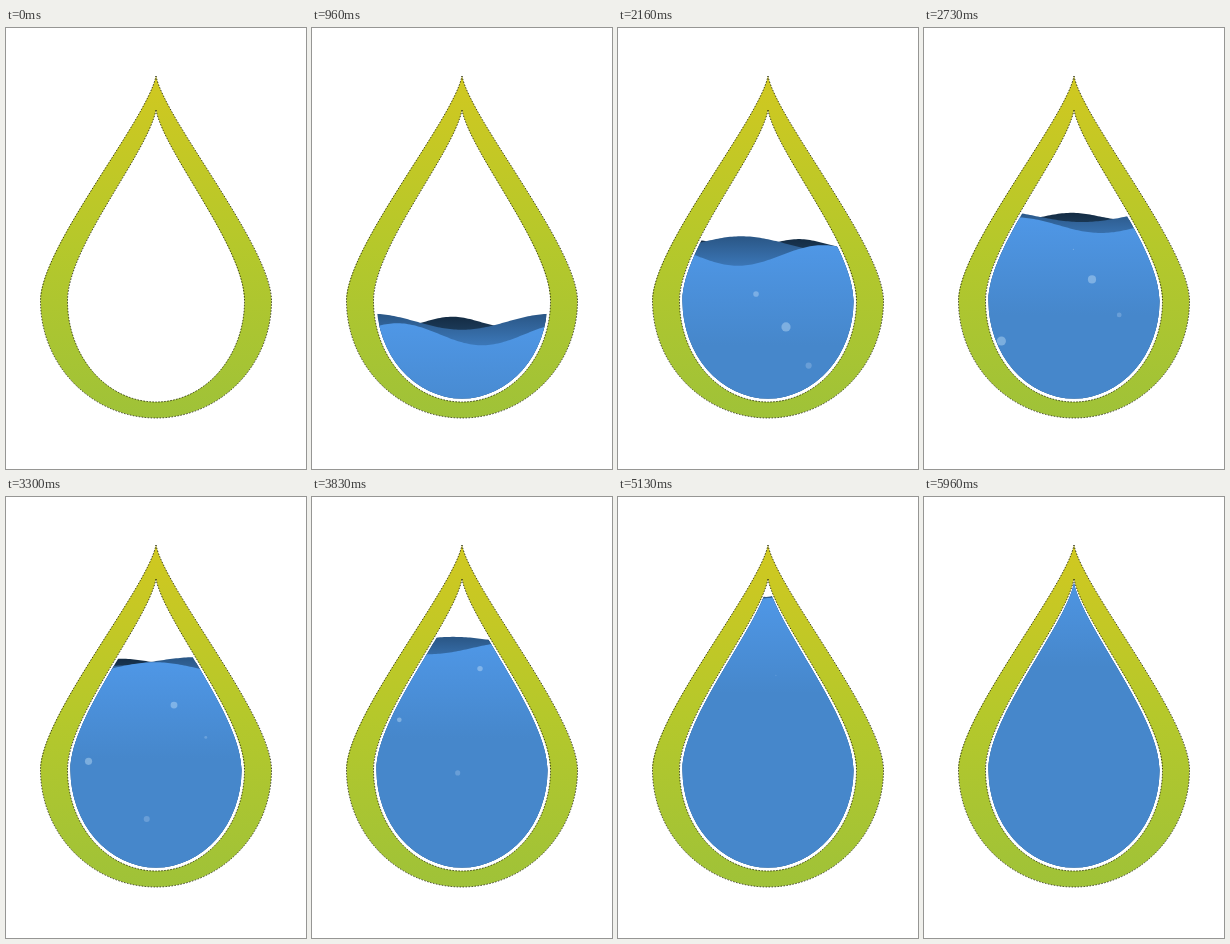
An HTML page with a canvas that plays this animation: 300 px wide and 441 px high, repeating every 6000 ms.

```html
<!DOCTYPE html>
<html lang="en">
<head>
<meta charset="utf-8">
<title>Filling drop</title>
<style>
  html, body { margin: 0; width: 100%; height: 100%; overflow: hidden; background: #fff; }
  canvas { display: block; width: 300px; height: 441px; }
</style>
</head>
<body>
<canvas id="stage"></canvas>
<script>
const W = 300, H = 441, LOOP = 6000, CX = 150, BELLY = 273, TAU = 2 * Math.PI;
const canvas = document.getElementById('stage');
const ratio = window.devicePixelRatio || 1;
canvas.width = W * ratio;
canvas.height = H * ratio;
const ctx = canvas.getContext('2d');
ctx.scale(ratio, ratio);

// A curved flank from the tip to the belly, closed by half an ellipse
function drop(tip, radius, bottom) {
  const path = new Path2D();
  const neck = 9, neckY = tip + 44, hipY = 219;
  path.moveTo(CX, tip);
  path.bezierCurveTo(CX + neck, neckY, CX + radius, hipY, CX + radius, BELLY);
  path.ellipse(CX, BELLY, radius, bottom - BELLY, 0, 0, Math.PI);
  path.bezierCurveTo(CX - radius, hipY, CX - neck, neckY, CX, tip);
  path.closePath();
  return path;
}

const tank = drop(86, 85.5, 370.5);
const ring = drop(48, 115.5, 390);
ring.addPath(drop(82, 88.5, 374));

function gradient(y0, y1, ...colors) {
  const g = ctx.createLinearGradient(0, y0, 0, y1);
  colors.forEach((c, i) => g.addColorStop(i / (colors.length - 1), c));
  return g;
}
const ringFill = gradient(48, 390, '#d0c820', '#b5c82b', '#9fc238');

// Fast at first, then a steady rise
const waterLevel = t => 250 - 30 * t + 145 * Math.exp(-0.72 * t);

// Back to front; crest is a peak's x at t = 0, speed in px/s
const waves = [
  { dip: 0, amp: 5, length: 110, crest: 196, speed: -58, depth: 22, colors: ['#142c44', '#23486c'] },
  { dip: 0, amp: 8, length: 180, crest: 333, speed: -97, depth: 22, colors: ['#2a5685', '#3b76b6'] },
  { dip: 12.5, amp: 11, length: 170, crest: -11, speed: 100, depth: 90, colors: ['#4f97e6', '#4687cb'] }
];

function drawWave(w, t, level) {
  const calm = Math.min(1, Math.max(0.55, 1 - (t - 2) * 0.4));
  const amp = w.amp * calm, mid = level + w.dip * calm;
  const crest = w.crest + w.speed * t;
  ctx.beginPath();
  ctx.moveTo(0, H);
  for (let x = 0; x <= W; x += 2) {
    ctx.lineTo(x, mid - amp * Math.cos((x - crest) / w.length * TAU));
  }
  ctx.lineTo(W, H);
  ctx.fillStyle = gradient(mid - amp, mid + w.depth, ...w.colors);
  ctx.fill();
}

const bubbles = [
  { born: 1.01, x: 115, drift: 20, r: 4.8, life: 1.75 },
  { born: 1.4, x: 168, drift: 0, r: 5.3, life: 3.3 },
  { born: 1.83, x: 188, drift: 8, r: 3.4, life: 1.8 },
  { born: 2.13, x: 72, drift: 9, r: 5.4, life: 2.1 },
  { born: 2.8, x: 136, drift: 9.4, r: 3.4, life: 2.4 }
];

// Bubbles slow down and shrink as they climb
function drawBubble(b, t) {
  const age = t - b.born;
  if (age < 0 || age > b.life) return;
  const y = 369 - 97 * age + 6.5 * age * age;
  const r = b.r * Math.sqrt(1 - age / b.life);
  ctx.fillStyle = `rgba(225, 242, 255, ${0.065 * b.r})`;
  ctx.beginPath();
  ctx.arc(b.x + b.drift * age, y, r, 0, TAU);
  ctx.fill();
}

function drawRing() {
  ctx.fillStyle = ringFill;
  ctx.fill(ring, 'evenodd');
  ctx.setLineDash([1.5, 1.5]);
  ctx.lineWidth = 1;
  ctx.strokeStyle = 'rgba(25, 28, 4, 0.8)';
  ctx.stroke(ring);
}

function render(ms) {
  const t = (ms % LOOP) / 1000;
  ctx.fillStyle = '#fff';
  ctx.fillRect(0, 0, W, H);
  ctx.save();
  ctx.clip(tank);
  waves.forEach(w => drawWave(w, t, waterLevel(t)));
  bubbles.forEach(b => drawBubble(b, t));
  ctx.restore();
  drawRing();
}

const begin = performance.now();
function tick() {
  render(performance.now() - begin);
  requestAnimationFrame(tick);
}
tick();
</script>
</body>
</html>
```
